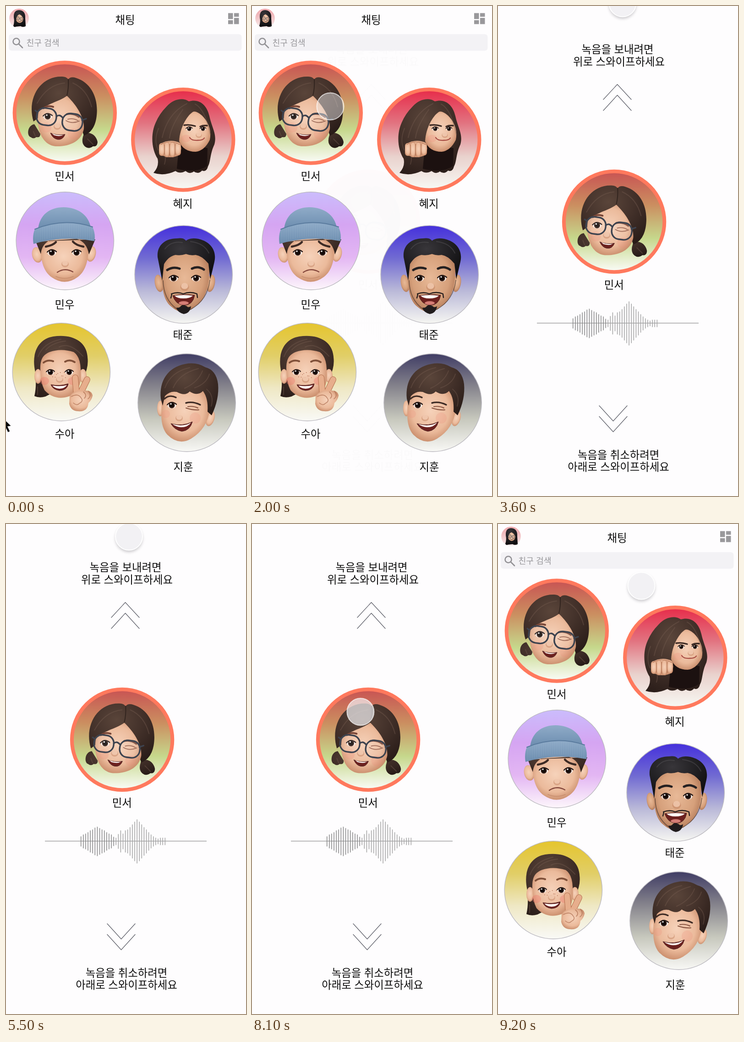
An HTML page for the animation above (9300 ms loop, 524 by 1069 pixels).

```html
<!DOCTYPE html>
<html lang="ko">
<head>
<meta charset="utf-8">
<title>채팅</title>
<style>
html, body { margin: 0; width: 100%; height: 100%; overflow: hidden; background: #fefdfe; }
svg { display: block; width: 100%; height: 100%; }
text { font: 23.4px "Noto Sans CJK KR", "Noto Sans CJK JP", "Noto Sans CJK", sans-serif; text-anchor: middle; fill: #0c0c0c; }
.search { font-size: 18.2px; text-anchor: start; fill: #98979b; }
.line { fill: none; stroke-linecap: round; stroke-linejoin: round; }
.brown { fill: url(#brown); }
.strand { stroke: #755c50; stroke-width: 2; opacity: .4; }
.fold { stroke: #a8694b; stroke-width: 1.6; opacity: .7; }
.brow { stroke: #3d2b25; stroke-width: 4; }
.mouth { fill: #6c211f; stroke: #4f2523; stroke-width: 1; }
.teeth { fill: #fff8f4; }
.rim { stroke: #bcbac0; stroke-width: 1.4; }
.ring { stroke: #ff795d; stroke-width: 8; }
.chevron { stroke: #60616b; stroke-width: 1.3; }
</style>
</head>
<body>
<svg viewBox="0 0 524 1069" preserveAspectRatio="none">
<defs>
  <radialGradient id="skin" cx=".48" cy=".45" r=".64">
    <stop stop-color="#f6d2ba"/><stop offset=".6" stop-color="#ebba9b"/><stop offset="1" stop-color="#bd7c5a"/>
  </radialGradient>
  <radialGradient id="tan" cx=".48" cy=".45" r=".64">
    <stop stop-color="#e8b997"/><stop offset=".6" stop-color="#d6a07b"/><stop offset="1" stop-color="#a3694a"/>
  </radialGradient>
  <radialGradient id="brown" cx=".42" cy=".28" r=".8">
    <stop stop-color="#5a453a"/><stop offset=".5" stop-color="#43312a"/><stop offset="1" stop-color="#291c18"/>
  </radialGradient>
  <radialGradient id="black" cx=".4" cy=".25" r=".8">
    <stop stop-color="#38363a"/><stop offset="1" stop-color="#0c0b0d"/>
  </radialGradient>
  <linearGradient id="wool" x2="0" y2="1">
    <stop stop-color="#8fabc8"/><stop offset="1" stop-color="#6b8cae"/>
  </linearGradient>
  <filter id="soft" x="-50%" y="-50%" width="200%" height="200%"><feGaussianBlur stdDeviation="3"/></filter>

  <g id="eye">
    <ellipse rx="9" ry="7" fill="#fff"/>
    <circle r="6.7" fill="#4a2a1d"/><circle r="5" fill="#120b0a"/>
    <circle cx="-2" cy="-3" r="1.7" fill="#fff"/>
    <path class="line" d="M-10-1Q-1-11 10-2" stroke="#201513" stroke-width="2.3"/>
  </g>
  <g id="nose">
    <ellipse rx="8" ry="7" cy="1" fill="#b87653" opacity=".4"/>
    <ellipse rx="6.5" ry="5.5" cy="-1" fill="#f8d3bb" opacity=".7"/>
  </g>

  <g id="minseo">
    <circle class="ring" cx="128.3" cy="233" r="109.7" fill="url(#bg0)"/>
    <path class="brown" d="M62 258C46 260 45 284 54 286Q60 291 66 286Q75 288 75 279ZM169 282C178 271 197 279 200 297Q199 308 190 306Q181 313 173 307Q163 299 169 282Z"/>
    <path class="brown" d="M60 252C45 202 74 154 120 154Q131 153 136 160Q141 153 153 157C188 168 204 205 197 246Q192 274 170 283L156 240L76 240Z"/>
    <path d="M133 196C116 209 87 213 71 231C65 264 77 303 108 306C141 307 165 294 170 268C172 243 153 215 133 196Z" fill="url(#skin)"/>
    <path class="line strand" d="M68 212Q90 172 128 168M146 168Q177 182 187 220M60 274l4 10M178 290l12 12"/>
    <path class="line" d="M136 160Q137 180 133 195" stroke="#1f1512" stroke-width="2" opacity=".6"/>
    <circle cx="88" cy="265" r="11" fill="#ee8576" opacity=".2"/><circle cx="147" cy="279" r="12" fill="#ee8576" opacity=".2"/>
    <use href="#eye" x="91" y="241"/>
    <path class="line" d="M131 250Q144 258 160 251M135 247Q147 244 157 250" stroke="#9c6550" stroke-width="2"/>
    <path class="line brow" d="M82 223Q91 216 103 220M133 236Q147 233 159 242" style="stroke:#784637"/>
    <use href="#nose" x="112" y="262"/>
    <path class="mouth" d="M97 277Q111 283 129 280Q124 293 112 291Q102 289 97 277Z"/>
    <path class="teeth" d="M100 278Q112 283 126 281Q118 286 105 282Z"/>
    <g fill="#fff" fill-opacity=".1" stroke="#3d434f" stroke-width="3.4">
      <rect x="67" y="223" width="43" height="37" rx="17" transform="rotate(7 88 241)"/>
      <rect x="123" y="235" width="44" height="37" rx="17" transform="rotate(7 145 253)"/>
      <path class="line" d="M110 241Q117 235 124 244M166 249L175 246M68 231L64 228"/>
    </g>
    <text x="128" y="379.7">민서</text>
  </g>

  <g id="hyeji">
    <circle class="ring" cx="386.8" cy="291.7" r="109.7" fill="url(#bg1)"/>
    <path class="brown" d="M350 220C368 199 390 201 399 208C424 201 439 218 444 240C450 267 461 280 455 302C445 323 447 340 441 350Q438 363 428 359Q420 368 410 361Q402 368 392 360Q380 367 370 360Q345 372 322 364Q335 350 331 333C318 313 315 280 327 254Q335 235 350 220Z"/>
    <path d="M378 300L440 310L439 349Q415 366 373 355Z" fill="#1c1110"/>
    <path d="M408 231C394 240 379 268 378 295Q387 318 414 318Q433 316 445 292Q451 262 428 239Q415 228 408 231Z" fill="url(#skin)"/>
    <path class="line strand" d="M395 213Q353 234 341 287M386 226Q360 262 357 288M346 345Q350 332 346 325M413 214Q435 226 446 280M333 267Q322 293 332 314"/>
    <ellipse cx="393" cy="289" rx="10" ry="8" fill="#ee7f75" opacity=".2"/>
    <use href="#eye" transform="translate(400 268) scale(.7)"/><use href="#eye" transform="translate(430 268) scale(.66)"/>
    <path class="line brow" d="M389 260Q401 258 413 262M424 263Q430 260 439 261" style="stroke-width:3.4"/>
    <use href="#nose" transform="translate(421 281) scale(.85)"/>
    <path class="line" d="M401 287Q405 294 419 293Q430 293 433 288" stroke="#a74c43" stroke-width="2.3"/>
    <g fill="url(#skin)">
      <path d="M338 300Q358 289 379 298Q386 310 379 325Q359 335 339 325Q330 313 338 300Z"/>
      <rect x="334" y="299" width="13" height="28" rx="6"/><rect x="345" y="297" width="13" height="33" rx="6"/>
      <rect x="357" y="297" width="13" height="33" rx="6"/><rect x="369" y="298" width="13" height="28" rx="6"/>
    </g>
    <path class="line fold" d="M346 303V323M357 302V325M369 302V324M338 302Q357 291 379 302"/>
    <text x="386" y="439.7">혜지</text>
  </g>

  <g id="minwoo">
    <circle class="rim" cx="128.8" cy="512.5" r="106.7" fill="url(#bg2)"/>
    <ellipse cx="68" cy="543" rx="11" ry="17" fill="url(#skin)" transform="rotate(-12 68 543)"/>
    <ellipse cx="186" cy="541" rx="10" ry="17" fill="url(#skin)" transform="rotate(12 186 541)"/>
    <path d="M75 500C74 545 77 576 100 592Q129 612 157 591C178 575 182 545 180 500Z" fill="url(#skin)"/>
    <path class="brown" d="M65 514L76 541Q78 521 94 512L155 508Q177 516 181 542L195 509Z"/>
    <path d="M70 487C73 456 95 439 126 439C158 440 180 456 185 483Z" fill="url(#wool)"/>
    <path d="M63 487Q126 461 189 482Q196 498 193 513Q126 500 60 519Q57 501 63 487Z" fill="url(#wool)"/>
    <path class="line" d="M63 487Q126 461 189 482" stroke="#597a9d" stroke-width="2"/>
    <path id="ribs" class="line" stroke="#aac1d7" opacity=".2"/>
    <use href="#eye" x="100" y="538"/><use href="#eye" x="154" y="538"/>
    <path class="line brow" d="M87 525Q103 522 109 515M146 514Q153 522 169 525" style="stroke-width:4.5"/>
    <path class="line fold" d="M109 590Q128 598 147 590" style="opacity:.4"/>
    <use href="#nose" x="129" y="562"/>
    <path class="line" d="M112 581Q128 570 146 580" stroke="#85483d" stroke-width="2.5"/>
    <text x="128" y="660">민우</text>
  </g>

  <g id="taejun">
    <circle class="rim" cx="387.7" cy="585.7" r="106.7" fill="url(#bg3)"/>
    <ellipse cx="334" cy="605" rx="9" ry="19" fill="url(#tan)" transform="rotate(-10 334 605)"/>
    <ellipse cx="447" cy="605" rx="9" ry="19" fill="url(#tan)" transform="rotate(10 447 605)"/>
    <path d="M342 545C337 600 340 640 361 656Q387 679 412 656C441 640 446 600 444 545Q394 520 342 545Z" fill="url(#tan)"/>
    <path d="M341 599Q336 572 331 548C329 524 345 507 374 507Q388 505 393 512Q402 505 420 508C450 515 460 537 455 558Q451 576 446 596L442 562Q428 545 414 543Q403 545 393 541Q382 545 370 543Q355 546 345 563Z" fill="url(#black)"/>
    <path class="line" d="M347 530Q361 512 385 516M403 514Q432 517 443 539" stroke="#605e62" stroke-width="2" opacity=".4"/>
    <use href="#eye" x="366" y="594"/><use href="#eye" x="415" y="594"/>
    <path class="line" d="M352 576Q365 568 379 573M406 573Q419 566 432 575" stroke="#242021" stroke-width="5"/>
    <use href="#nose" transform="translate(390 612) scale(1.2)"/>
    <path class="mouth" d="M364 632Q388 627 412 631Q408 653 388 653Q370 651 364 632Z"/>
    <path class="teeth" d="M368 632Q389 629 408 632Q402 638 387 638Q374 638 368 632Z"/>
    <ellipse cx="388" cy="648" rx="11" ry="4" fill="#d57d75"/>
    <path class="line" d="M361 628Q375 623 387 628Q402 622 417 628M362 629L360 637M417 629L418 636" stroke="#231c1c" stroke-width="2.3"/>
    <path d="M372 658Q380 659 382 654Q388 651 395 655Q397 659 404 655Q402 670 388 672Q374 668 372 658Z" fill="#211c1d"/>
    <path class="line" d="M343 599Q344 640 373 661M445 598Q440 642 403 662" stroke="#35251f" stroke-width="1.6" opacity=".6"/>
    <text x="386" y="726.3">태준</text>
  </g>

  <g id="sua">
    <circle class="rim" cx="120.8" cy="798.5" r="106.7" fill="url(#bg4)"/>
    <path class="brown" d="M62 851Q67 831 64 799C55 760 68 727 103 721C144 715 176 731 178 766Q181 789 169 810L86 852Q73 856 62 851Z"/>
    <ellipse cx="70" cy="808" rx="8" ry="16" fill="url(#skin)"/><ellipse cx="168" cy="807" rx="8" ry="15" fill="url(#skin)"/>
    <path d="M75 795C74 770 81 761 95 755Q120 746 148 755Q162 765 163 792C166 826 158 849 128 854Q102 858 84 838Q75 820 75 795Z" fill="url(#skin)"/>
    <path class="line strand" d="M70 765Q81 735 120 727M87 750Q102 734 130 731M116 744Q139 732 168 764M69 831V848"/>
    <ellipse cx="84" cy="818" rx="10" ry="9" fill="#ef7268" opacity=".35"/><ellipse cx="146" cy="818" rx="11" ry="9" fill="#ef7268" opacity=".35"/>
    <use href="#eye" transform="translate(97 799) scale(.9)"/><use href="#eye" transform="translate(138 799) scale(.9)"/>
    <path class="line brow" d="M82 778Q91 771 103 775M129 776Q139 770 150 777" style="stroke:#805039"/>
    <path id="freckles" class="line" stroke="#a75f43" stroke-width="1.6"/>
    <use href="#nose" x="117" y="814"/>
    <path class="mouth" d="M98 826Q117 830 136 824Q134 838 117 839Q102 837 98 826Z"/>
    <path class="teeth" d="M101 828Q119 831 133 827Q129 834 117 835Q106 834 101 828Z"/>
    <path class="line" d="M151 811L154 847M177 815L161 848" stroke="#b5714f" stroke-width="14"/>
    <path class="line" d="M151 811L154 847M177 815L161 848" stroke="#e7ae8c" stroke-width="12"/>
    <path d="M139 851Q148 837 165 840Q187 836 189 850Q187 860 180 866Q178 886 158 884Q142 884 138 868Z" fill="url(#skin)"/>
    <path class="line fold" d="M143 852Q157 844 164 855Q170 862 160 867M169 842Q178 849 171 856M180 840Q188 850 179 857M147 866Q155 873 160 867"/>
    <text x="128" y="941.5">수아</text>
  </g>

  <g id="jihoon">
    <circle class="rim" cx="394.6" cy="865.5" r="106.7" fill="url(#bg5)"/>
    <ellipse cx="337" cy="878" rx="7" ry="17" fill="url(#skin)"/><ellipse cx="446" cy="900" rx="9" ry="17" fill="url(#skin)" transform="rotate(18 446 900)"/>
    <path d="M345 838C337 880 335 916 352 935Q377 960 404 944Q440 922 445 880Q444 844 425 827Z" fill="url(#skin)"/>
    <path class="brown" d="M338 857C334 817 354 788 391 781Q415 776 435 788Q459 794 463 825Q466 857 449 893L440 885Q442 856 430 840Q418 852 401 841Q391 852 373 842Q358 839 347 851L342 872Z"/>
    <path class="line strand" d="M347 833Q360 798 401 789M365 833Q378 802 420 791M390 834Q420 820 429 796M412 833Q438 824 444 803M438 836Q455 850 448 873"/>
    <circle cx="349" cy="890" r="9" fill="#ef8877" opacity=".2"/><circle cx="413" cy="899" r="12" fill="#ef8877" opacity=".2"/>
    <use href="#eye" x="362" y="871"/>
    <path class="line" d="M393 877Q407 882 421 881M397 874Q409 872 419 877" stroke="#875340" stroke-width="2"/>
    <path class="line brow" d="M346 857Q357 847 371 854M393 866Q408 862 424 870" style="stroke-width:3.4"/>
    <use href="#nose" x="378" y="898"/>
    <path class="mouth" d="M360 911Q385 918 407 907Q402 926 384 928Q368 925 360 911Z"/>
    <path class="teeth" d="M363 912Q386 919 404 909Q397 919 382 919Q371 918 363 912Z"/>
    <text x="387" y="1013.8">지훈</text>
  </g>
</defs>

<rect width="524" height="1069" fill="#fefdfe"/>
<g id="record">
  <text x="261" y="102.5">녹음을 보내려면</text><text x="264" y="129.7">위로 스와이프하세요</text>
  <path class="line chevron" d="M230 204L260.5 171L291 204M230 228L260.5 194.5L291 228M221 872L251.5 905.5L282 872M221 895.5L251.5 929L282 895.5"/>
  <use href="#minseo" x="125.3" y="237.5"/>
  <path d="M85 691.7H438" stroke="#a3a3a4" stroke-width="1.5"/>
  <path id="loud" stroke="#858586" stroke-width="1.5"/><path id="quiet" stroke="#a2a2a3" stroke-width="1.5"/>
  <text x="263" y="987.5">녹음을 취소하려면</text><text x="263" y="1014">아래로 스와이프하세요</text>
</g>
<g id="list">
  <circle cx="28.5" cy="27" r="21.3" fill="url(#bg6)"/>
  <path d="M17 25Q16 9 29 9Q43 10 42 27L43 44Q37 47 32 44L22 45Q17 47 16 43Q19 34 17 25Z" fill="url(#black)"/>
  <path d="M29 18Q23 22 22 28Q22 36 30 37Q37 36 38 28Q36 21 29 18Z" fill="url(#skin)"/>
  <g class="line" stroke="#444247" stroke-width="1"><circle cx="26" cy="27" r="3.6"/><circle cx="34.5" cy="28" r="3.6"/><path d="M27 33q3 2 6 0"/></g>
  <path d="M25.5 27h1M34.5 28h1" stroke="#171214" stroke-width="2.5"/>
  <text x="260" y="39.3">채팅</text>
  <path d="M485 15.5h10.5v13H485zM498 15.5h10.5v8H498zM485 31h10.5v8.5H485zM498 26h10.5v13.5H498z" fill="#99989b"/>
  <rect x="6" y="61.5" width="508.5" height="36" rx="6" fill="#f3f2f5"/>
  <g class="line" stroke="#929195" stroke-width="2.6"><circle cx="22.5" cy="77.5" r="7"/><path d="M28 83l8 8"/></g>
  <text class="search" x="44.5" y="86.7">친구 검색</text>
  <use href="#minseo"/><use href="#hyeji"/><use href="#minwoo"/><use href="#taejun"/><use href="#sua"/><use href="#jihoon"/>
</g>
<g id="touch">
  <circle id="shade" cy="4" r="29.5" fill="#6b6870" filter="url(#soft)"/>
  <circle id="disc" r="29.5" fill="#f2f1f4" stroke="#fff" stroke-width="2"/>
</g>
<path id="arrow" d="M-9 896L12 916.5L4 917.5L9 928L4 930.5L-1 920L-9 928Z" fill="#080808" stroke="#fff" stroke-width="1.3"/>
</svg>
<script>
const $ = id => document.getElementById(id);
const LOOP = 9300, STEP = 100;

// Backdrop colours from top to bottom
const skies = [
  ['#c85353', '#cb8e60', '#c6d88c', '#fbfcf9'],
  ['#e72b49', '#e27380', '#e9d2cd', '#f8f9f4'],
  ['#cbbcfc', '#d5a5f2', '#e3b6f3', '#fdf6fb'],
  ['#4530dc', '#716bd2', '#bab9d8', '#f6f6f2'],
  ['#e5c52e', '#e1ce67', '#efe8c5', '#f9f9f6'],
  ['#403d65', '#85838c', '#c7c8bd', '#f8f8f5'],
  ['#efa9ad', '#f0babd', '#f4d4d5', '#f8eeee']
];
const defs = document.querySelector('defs');
skies.forEach((colors, n) => {
  const stops = colors.map((c, i) => `<stop offset="${i / 3}" stop-color="${c}"/>`).join('');
  defs.insertAdjacentHTML('beforeend', `<linearGradient id="bg${n}" x2="0" y2="1">${stops}</linearGradient>`);
});

const bars = [11, 15, 17, 20, 24, 26, 30, 32, 29, 26, 24, 20, 17, 15, 10, 8, 16, 24, 17,
  24, 26, 31, 37, 43, 48, 43, 37, 31, 26, 20, 15, 11, 8, 6, 8, 8, 8];
const drawBars = (from, to) => bars.slice(from, to)
  .map((h, i) => `M${163.7 + 5.1 * (from + i)} ${692.5 - h}v${2 * h}`).join('');
$('loud').setAttribute('d', drawBars(0, 15));
$('quiet').setAttribute('d', drawBars(15));

let ribs = '', freckles = '';
for (let i = 0; i < 26; i++) ribs += `M${65 + i * 4.9} ${488 - 13 * Math.sin(i / 25 * 2.9)}v27`;
for (let i = 0; i < 14; i++) freckles += `M${99 + i * 2.8} ${805 + 6 * Math.sin(i * 2.4)}h.1`;
$('ribs').setAttribute('d', ribs);
$('freckles').setAttribute('d', freckles);

// Rows: time, then values
const path = [[0, -45, 915], [100, -36, 910], [1000, 162, 236], [1300, 171, 219], [2000, 171, 219],
  [2300, 272, -6], [5400, 272, -6], [6000, 225, 446], [8000, 225, 446], [8400, 301, 214], [8700, 313, 135]];
const fill = [[0, 1], [1400, 1], [1500, .45], [2000, .45], [2200, 1], [6500, 1],
  [6700, .77], [8000, .77], [8400, .35], [8600, 1]];
const listFade = [[2000, 1], [2400, .08], [2500, 0], [8150, 0], [8400, .48], [8700, 1]];
const recordFade = [[1950, 0], [2000, .01], [2400, .87], [2500, 1], [8150, 1], [8400, .72], [8700, 0]];

function at(rows, t) {
  const n = rows.findIndex(r => r[0] > t);
  if (n < 0) return rows[rows.length - 1].slice(1);
  if (n === 0) return rows[0].slice(1);
  const a = rows[n - 1], b = rows[n];
  const p = (t - a[0]) / (b[0] - a[0]), e = p * p * (3 - 2 * p);
  return a.slice(1).map((v, i) => v + (b[i + 1] - v) * e);
}

function draw(now) {
  const t = Math.floor(now % LOOP / STEP) * STEP;
  const [x, y] = at(path, t), [alpha] = at(fill, t);
  const raised = alpha > .9;
  $('list').setAttribute('opacity', at(listFade, t)[0]);
  $('record').setAttribute('opacity', at(recordFade, t)[0]);
  $('touch').setAttribute('transform', `translate(${x} ${y})`);
  $('disc').setAttribute('fill-opacity', alpha);
  $('disc').setAttribute('stroke-opacity', raised ? 1 : .7);
  $('shade').setAttribute('opacity', raised ? .36 : 0);
  $('arrow').setAttribute('visibility', t < 100 ? 'visible' : 'hidden');
}

const start = performance.now();
function tick() {
  draw(performance.now() - start);
  requestAnimationFrame(tick);
}
tick();
</script>
</body>
</html>
```
